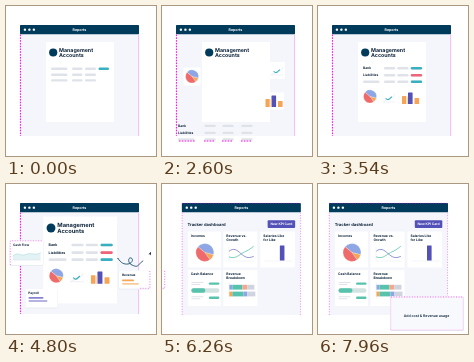
Recreate the animation shown at these times as an HTML page. Size 150 by 150 pixels, loop 8 s.

```html
<!DOCTYPE html>
<html lang="en">
<head>
<meta charset="utf-8">
<title>Reports</title>
<style>
html, body { margin: 0; width: 100%; height: 100%; overflow: hidden; background: #fff; }
svg { display: block; width: 100vw; height: 100vh; }
text { font-family: Inter, "Open Sans", sans-serif; font-weight: 700; fill: #10263c; text-rendering: geometricPrecision; }
</style>
</head>
<body>
<svg id="stage" viewBox="0 0 150 150"></svg>
<script>
const LOOP = 8000;
const NAVY = '#003b5c', BODY = '#f4f6fb', GREY = '#dfe3e9', TEAL = '#38b0c0', MINT = '#58c3ad',
  PINK = '#ee6478', CORAL = '#ef6a6a', BLUE = '#8ea7e4', PURPLE = '#5350b8', ORANGE = '#f6a456', MAGENTA = '#ff00e6';

const rect = (x, y, w, h, fill, r = 0) =>
  `<rect x="${x}" y="${y}" width="${w}" height="${h}" rx="${r}" fill="${fill}"/>`;
const bar = (x, y, w, fill = GREY, h = 2.4) => rect(x, y - h / 2, w, h, fill, h / 2);
const text = (x, y, size, str, extra = '') =>
  `<text x="${x}" y="${y}" font-size="${size}" ${extra}>${str}</text>`;
const mid = 'text-anchor="middle"';
const path = (d, color, w = 0.8, extra = '') =>
  `<path d="${d}" fill="none" stroke="${color}" stroke-width="${w}" stroke-linecap="round" ${extra}/>`;
const dash = (d, gap = '1.6 1.2', o = 1, w = 1) =>
  `<path d="${d}" fill="none" stroke="${MAGENTA}" stroke-width="${w}" stroke-dasharray="${gap}" opacity="${o}"/>`;
const group = (id, body) => `<g id="${id}">${body}</g>`;
const card = (x, y, w, h, body = '', fill = '#fff') =>
  rect(x - 0.4, y, w + 0.8, h + 0.9, '#e9ecf3', 1.4) + rect(x, y, w, h, fill, 1.2) + body;

function frame(x, y, w, h, head, title, size, fill) {
  let s = rect(x, y, w, h, fill, 1) + rect(x, y, w, head, NAVY, 0.8);
  for (let i = 0; i < 3; i++)
    s += `<circle cx="${x + head * (0.53 + i * 0.48)}" cy="${y + head / 2}" r="${head * 0.13}" fill="#fff"/>`;
  return s + text(x + w / 2, y + head / 2 + size * 0.36, size, title, mid + ' style="fill:#fff"');
}

function pie(cx, cy, r) {
  const pt = a => `${cx + r * Math.sin(a * Math.PI / 180)} ${cy - r * Math.cos(a * Math.PI / 180)}`;
  const slice = (a, b, fill) =>
    `<path d="M${cx} ${cy}L${pt(a)}A${r} ${r} 0 ${b - a > 180 ? 1 : 0} 1 ${pt(b)}Z" fill="${fill}" stroke="#fff" stroke-width=".25"/>`;
  return slice(-50, 105, BLUE) + slice(105, 145, ORANGE) + slice(145, 310, CORAL);
}

const rowY = [121, 128, 134.5];
const column = (x, w, fills) => rowY.map((y, i) => bar(x, y, w, fills[i])).join('');
const greys = [GREY, GREY, GREY];

const plainRows = [62.8, 68.8, 74.4].map((y, i) =>
  bar(45, y, 16.5) + bar(66, y, 10.5) + bar(79, y, 11) + (i ? '' : bar(92.5, y, 10.5, TEAL))).join('');

const trendChart = rect(-8, -8.5, 16, 17, '#fff', 1)
  + path('M-6 4.5H6', '#e1e6f0', 0.5)
  + path('M-5 4C-3 1 -1 4 1 1.5S4 1 5.5 -2.5', '#d3daf0', 0.5)
  + path('M-3 1C-1 3.5 1 1 2.5 -0.5', TEAL, 1.1);
const barChart = rect(-10, -8.5, 20, 17, '#fff', 1)
  + rect(-8.5, -2, 4.2, 8, ORANGE, 0.5) + rect(-2.5, -5.5, 4.6, 11.5, PURPLE, 0.5)
  + rect(4, 0, 4.6, 6, ORANGE, 0.5) + rect(-3.6, -1.5, 0.9, 7.5, '#f8ce9e');

const tab = (x, w, label, fill) =>
  rect(x, 103, w, 8.5, fill, 0.8) + text(x + w / 2, 108.4, 3.3, label, mid);
const month = (x, label) => text(x, 115.9, 2.3, label, mid + ' style="font-weight:400;fill:#a0abb8"');

const forecast = frame(4, 82, 92.5, 64, 8, 'Forecasting', 3.4, '#fff')
  + text(7, 98.6, 4.1, 'Loan requirements')
  + tab(6, 29.5, 'Profit &amp; Loss', '#e6ecf4') + tab(37, 29.5, 'Balance Sheet', '#fff') + tab(68, 25.5, 'Cash Flow', '#e6ecf4')
  + month(47.5, 'January') + month(66, 'February') + month(88, 'March')
  + path('M11 119.8l1.2 1.2 -1.2 1.2M11 126.8l1.2 1.2 -1.2 1.2', '#63758a', 0.6)
  + path('M6 124.5H94M6 131.5H94', '#eef1f5', 0.4)
  + dash('M4.4 90V146') + dash('M96.4 90V146', 'none', 0.35, 0.6);

const rows = group('labels', text(15.5, 122.2, 3.3, 'Bank') + text(15.5, 129.2, 3.3, 'Liabilities') + bar(15.5, 134.5, 16.5))
  + group('colA', column(42, 11.3, greys)) + group('colB', column(60, 11.3, greys))
  + group('colC', column(79, 11.3, greys) + group('tint', column(79, 11.3, [TEAL, PINK, TEAL])))
  + group('marks', dash('M17 135H33M42 135H53M60 135H71M79 135H90'));

const paper = rect(40, 36, 68, 80, '#fff', 0.6)
  + `<circle cx="47.2" cy="46.5" r="4.1" fill="${NAVY}"/>`
  + text(53, 45.6, 5.3, 'Management') + text(53, 51.4, 5.3, 'Accounts')
  + group('plain', plainRows)
  + group('pie', rect(-8.5, -9, 17, 18, '#fff', 1) + pie(0, 0, 6.5))
  + group('trend', trendChart) + group('bars', barChart)
  + group('forecast', forecast) + group('rows', rows);

const cash = card(4, 56.5, 33, 24.5, text(7, 62.4, 3.2, 'Cash Flow')
  + '<path d="M7 72C12 67 15 73 20 70.5S29 72 34.5 69V76H7Z" fill="#e3f3f5"/>'
  + path('M7 72C12 67 15 73 20 70.5S29 72 34.5 69', '#a8d8dd', 0.6)
  + path('M7 76H34.5', '#d5dbe5', 0.5)
  + dash('M4.3 81V56.8H37', '1 1.6', 0.7, 0.7));
const payroll = card(19.5, 105, 32, 18.5, text(22.3, 110.2, 3.2, 'Payroll')
  + bar(22.5, 113.8, 15, '#8583cf', 1.8) + bar(22.5, 117, 19, '#b4b3e2', 1.8));
const revenue = card(113, 86.5, 31, 18, text(116, 92, 3.2, 'Revenue')
  + bar(116, 96.3, 12, ORANGE, 1.8) + bar(116, 99.8, 17, '#f9cb9c', 1.8)
  + dash('M143.8 87V104.3H133', '1 1.6', 0.7, 0.7));

const flight = 'M112 74.5C115 79 118 80.5 122 80S128 75 125 74S121.5 79 126 81S131 82.5 133 80.5S139 75 143 71.5S146 48 142 36S139 24 141 18';

const reports = frame(14, 19, 119, 111, 9.3, 'Reports', 3.6, BODY)
  + dash('M14.4 28.5V130') + dash('M132.6 28.5V130', 'none', 0.4, 0.6)
  + group('paper', paper)
  + group('cash', cash) + group('payroll', payroll) + group('revenue', revenue)
  + path(flight, NAVY, 0.8, 'id="trail" pathLength="100"')
  + group('plane', '<path d="M1.8 0L-1.6 -1.3L-.8 0L-1.6 1.3Z" fill="#10263c"/>');

const tile = (x, y, w, lines, body) => rect(x, y, w, 36, '#fff', 0.8)
  + lines.map((s, i) => text(x + 3, y + 5.1 + i * 4.1, 3.4, s)).join('') + body;
const stack = (y, parts, h) => {
  let x = 58.5;
  return parts.map(([w, fill]) => { const s = rect(x, y, w, h, fill); x += w; return s; }).join('');
};
const dashboard = frame(11, 19, 119, 112, 9.3, 'Reports', 3.6, BODY)
  + text(16.7, 41.5, 4.15, 'Tracker dashboard')
  + rect(96.8, 36.3, 27.5, 7.6, PURPLE, 1) + text(110.5, 41.3, 3.3, 'New KPI Card', mid + ' style="fill:#fff"')
  + tile(17, 47.5, 33, ['Incomes'], pie(34, 68.5, 9))
  + tile(52.5, 47.5, 34, ['Revenue vs.', 'Growth'],
    path('M58 63V77H83', '#e1e6ee', 0.4)
    + path('M58.5 73C64 75 67 72 71 69.5S77 67 82.5 62.5', MINT)
    + path('M58.5 67C63 63.5 66 66 70 69.5S77 75 82.5 72.5', '#7779c8'))
  + tile(89.5, 47.5, 34.5, ['Salaries Like', 'for Like'],
    path('M94 77H121', '#e1e6ee', 0.4) + rect(109, 61.5, 4.6, 15, PURPLE, 0.3))
  + tile(17, 86, 33, ['Cash Balance'],
    bar(20.5, 98.4, 12, GREY, 1) + bar(20.5, 100.5, 9, GREY, 1) + bar(38, 99.6, 10.5, MINT)
    + bar(20.5, 106.5, 28, '#d3e3e2', 4.4) + bar(20.5, 106.5, 14, MINT, 4.4)
    + bar(20.5, 112.8, 12, GREY, 1) + bar(20.5, 114.8, 9, GREY, 1) + bar(38, 113.8, 10.5, MINT))
  + tile(52.5, 86, 34, ['Revenue', 'Breakdown'],
    path('M58.3 99V114', '#d5dbe5', 0.4)
    + stack(100.8, [[3, BLUE], [10, MINT], [5, '#f3a98f'], [7, '#cfd5e0']], 4.8)
    + stack(107.6, [[3, ORANGE], [11, MINT], [4, BLUE], [8, '#cfd5e0']], 4.8))
  + dash('M11 19.3H130', '1 1.6', 0.75, 0.7) + dash('M129.6 28.5V131', '1 1.6', 0.6, 0.7)
  + dash('M11.3 28.5V131', '1 1.6', 0.7, 0.7);

const popup = card(72.5, 112.5, 73, 33.5,
  text(108.5, 133.3, 3.55, 'Add cost &amp; Revenue usage', mid + ' style="font-weight:600"')
  + dash('M72.8 113V146H145.2V113', 'none', 0.25, 0.5)
  + group('edge', dash('M73 113H145', '1 1.6', 0.8, 0.8)), '#f8f9fd');

document.getElementById('stage').innerHTML =
  group('reports', reports) + group('dashboard', dashboard) + group('popup', popup);

const get = id => document.getElementById(id);
const linear = p => p;
const inOut = p => p < 0.5 ? 2 * p * p : 1 - 2 * (1 - p) ** 2;
const out = p => 1 - (1 - p) ** 3;
const tracks = [];

// Each step: [ms, values, easing towards the next step]
function valueAt(steps, t) {
  const next = steps.findIndex(s => s[0] > t);
  if (next === 0) return steps[0][1];
  if (next < 0) return steps[steps.length - 1][1];
  const [t0, a, ease = linear] = steps[next - 1], [t1, b] = steps[next];
  const p = ease((t - t0) / (t1 - t0));
  return a.map((v, i) => v + (b[i] - v) * p);
}
const play = (steps, apply) => tracks.push(t => apply(valueAt(steps, t)));
const opacity = (id, steps) => play(steps.map(([ms, v]) => [ms, [v]]), ([v]) => get(id).setAttribute('opacity', v));
const fade = (id, a, b, from, to) => opacity(id, [[a, from], [b, to]]);
const place = (id, steps, ox = 0, oy = 0) => play(steps, ([x, y, s]) =>
  get(id).setAttribute('transform', `translate(${x + ox * (1 - s)} ${y + oy * (1 - s)}) scale(${s})`));
const slide = (id, a, b, from, to) => place(id, [[a, [...from, 1], inOut], [b, [...to, 1]]]);
const grow = (id, a, b, from, to, ease, ox, oy) =>
  place(id, [[a, [0, 0, from], ease], [b, [0, 0, to]]], ox, oy);

// Charts and forecast appear
for (const id of ['forecast', 'rows']) grow(id, 340, 900, 0.85, 1, out, 50, 114);
opacity('forecast', [[340, 0], [640, 1], [2180, 1], [2500, 0]]);
fade('rows', 340, 640, 0, 1);
fade('plain', 2180, 2500, 1, 0);

// Rows fly into the paper
[['labels', 29.5], ['colA', 24], ['colB', 19.2], ['colC', 13.8]].forEach(([id, dx]) =>
  slide(id, 2560, 2980, [0, 0], [dx, -58.8]));
opacity('marks', [[2440, 0], [2520, 1], [2600, 1], [2700, 0]]);
fade('tint', 3200, 3500, 0, 1);

// Charts pop up, then settle on the paper
function chart(id, t, from, to) {
  place(id, [[t, [...from, 0.6], out], [t + 420, [...from, 1]],
    [t + 2740, [...from, 1], inOut], [t + 3220, [...to, 1]]]);
  fade(id, t, t + 220, 0, 1);
}
chart('pie', 260, [30, 70.5], [52, 90.5]);
chart('trend', 290, [115, 64.5], [71, 91.5]);
chart('bars', 320, [112, 95], [92.5, 92]);

// Paper grows, side cards pop in
grow('paper', 3820, 4360, 1, 1.085, inOut, 73, 76);
[['cash', 3960, 20, 69], ['payroll', 4060, 36, 114], ['revenue', 4160, 129, 95]].forEach(([id, t, ox, oy]) => {
  grow(id, t, t + 440, 0.75, 1, out, ox, oy);
  fade(id, t, t + 220, 0, 1);
});

// The plane flies off and its trail follows
const trail = get('trail'), length = trail.getTotalLength();
play([[4640, [0]], [4800, [0.51]], [5160, [1]]], ([p]) => {
  const a = trail.getPointAtLength(length * p), b = trail.getPointAtLength(length * p - 1);
  const angle = Math.atan2(a.y - b.y, a.x - b.x) * 180 / Math.PI;
  get('plane').setAttribute('transform', `translate(${a.x} ${a.y}) rotate(${angle})`);
  const end = Math.max(0, p * 100 - 10), start = Math.max(0, end - 42);
  trail.setAttribute('stroke-dasharray', `0 ${start} ${end - start} 200`);
});
for (const id of ['trail', 'plane'])
  opacity(id, [[4640, 0], [4680, 1], [4980, 1], [5160, 0]]);

// Dashboard and popup
slide('reports', 5880, 6340, [0, 0], [-150, 0]);
slide('dashboard', 5880, 6340, [150, 0], [0, 0]);
slide('popup', 6800, 7380, [79, 0], [0, 0]);
fade('edge', 7800, 7960, 0, 1);

const begin = performance.now();
function draw() {
  const t = Math.max(0, performance.now() - begin) % LOOP;
  tracks.forEach(track => track(t));
  requestAnimationFrame(draw);
}
draw();
</script>
</body>
</html>
```
